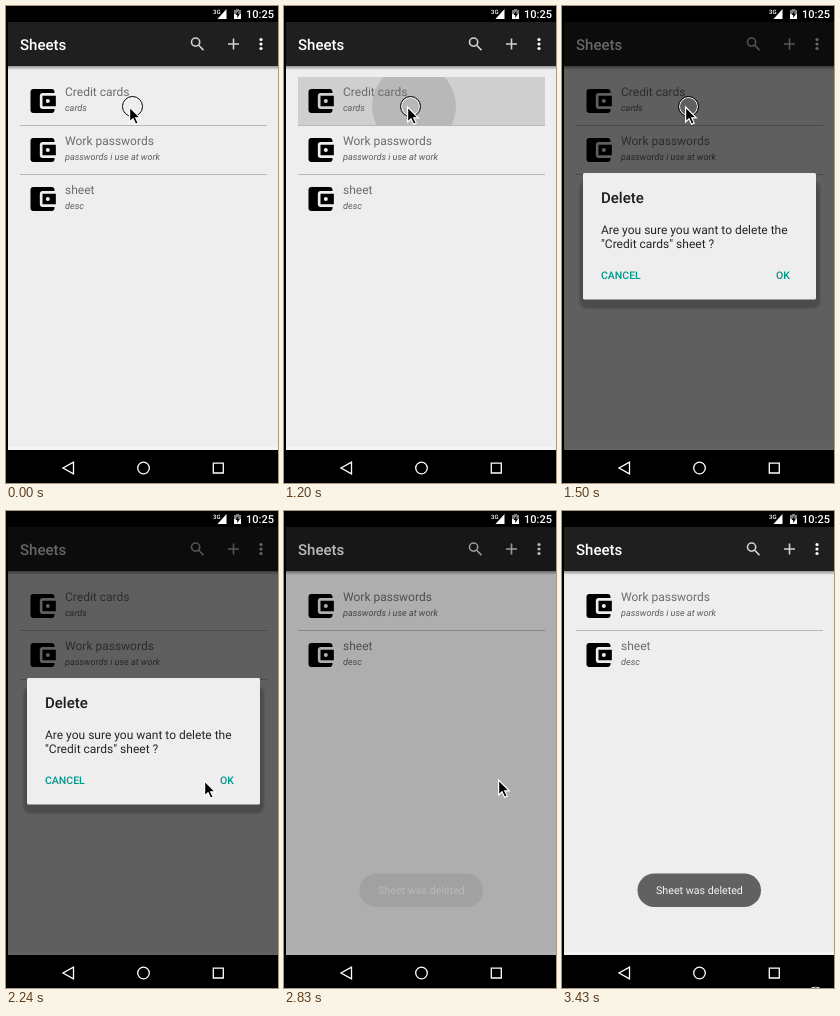
These frames come from a looping animation (272x477 px, 3500 ms). An HTML page:

```html
<!DOCTYPE html>
<html lang="en">
<head>
<meta charset="utf-8">
<title>Sheets</title>
<style>
  html, body { margin: 0; width: 100%; height: 100%; overflow: hidden; background: #000; }
  svg { display: block; width: 100vw; height: 100vh; }
  text { font-family: Roboto, sans-serif; text-rendering: geometricPrecision; }
  .bold { font-weight: 500; }
  .name { font-size: 12px; fill: #6c6c6c; }
  .note { font-size: 9.1px; font-style: italic; fill: #5c5c5c; }
  .head { font-size: 15px; }
  .body { font-size: 12px; fill: #242424; }
  .button { font-size: 10.5px; fill: #009688; }
  .line { fill: none; stroke: #fff; stroke-width: 1.3; }
</style>
</head>
<body>
<svg viewBox="0 0 272 477">
  <defs>
    <linearGradient id="shade" x2="0" y2="1">
      <stop stop-opacity=".38"/>
      <stop offset="1" stop-opacity="0"/>
    </linearGradient>
    <filter id="blur" x="-20%" y="-20%" width="140%" height="140%"><feGaussianBlur stdDeviation="1.2"/></filter>
    <clipPath id="rowClip"><path d="M14 71h247v48H14z"/></clipPath>
    <symbol id="wallet" viewBox="0 0 24 24">
      <path d="M21 18v1c0 1.1-.9 2-2 2H5c-1.1 0-2-.9-2-2V5c0-1.1.9-2 2-2h14c1.1 0 2 .9 2 2v1h-9c-1.1 0-2 .9-2 2v8c0 1.1.9 2 2 2zM12 16h10V8H12zm4-2.5a1.5 1.5 0 1 1 0-3 1.5 1.5 0 0 1 0 3z"/>
    </symbol>
  </defs>

  <path fill="#eee" d="M2 60h270v384H2z"/>
  <path fill="#f4f4f4" d="M2 441h270v3H2z"/>
  <path fill="url(#shade)" d="M2 60h270v4H2z"/>
  <path fill="#1f1f1f" d="M2 16h270v44H2z"/>

  <text class="head bold" x="14" y="43.5" fill="#fff">Sheets</text>
  <g fill="none" stroke="#d2d2d2" stroke-width="1.6">
    <circle cx="189.6" cy="36.1" r="4.1"/>
    <path d="M192.6 39.2l4.9 4.9M227.5 32.5v11M222 38h11"/>
  </g>
  <g fill="#fff">
    <circle cx="255" cy="33.5" r="1.6"/>
    <circle cx="255" cy="38" r="1.6"/>
    <circle cx="255" cy="42.5" r="1.6"/>
  </g>

  <g clip-path="url(#rowClip)">
    <path id="tint" d="M14 71h247v48H14z"/>
    <circle id="ripple" cx="130" cy="100" opacity=".11"/>
  </g>
  <g id="rows"></g>

  <path id="dim" d="M2 16h270v428H2z"/>

  <g id="dialog">
    <rect x="17.5" y="175" width="240.5" height="127.5" rx="7" opacity=".2" filter="url(#blur)"/>
    <rect x="21" y="167" width="233" height="126.5" rx="1.5" fill="#eee"/>
    <text class="head bold" x="39" y="197" fill="#1c1c1c">Delete</text>
    <text class="body" x="39" y="228">Are you sure you want to delete the</text>
    <text class="body" x="39" y="242">"Credit cards" sheet ?</text>
    <rect id="okPress" x="200" y="256" width="42" height="30" rx="1.5"/>
    <text class="button bold" x="39" y="273.3">CANCEL</text>
    <text class="button bold" x="214" y="273.3">OK</text>
  </g>

  <g id="toast">
    <rect x="75.5" y="362.5" width="123.5" height="33.5" rx="16.75" fill="#616161"/>
    <text x="94" y="383.3" font-size="10.7" fill="#f4f4f4">Sheet was deleted</text>
  </g>

  <path d="M0 0h272v16H0zM0 0h2v477H0zM0 444h272v33H0z"/>
  <g fill="#fff">
    <text class="bold" x="207" y="7.5" font-size="6">3G</text>
    <path d="M220.5 3v10h-9z"/>
    <path d="M228 4h2V3h3v1h2v4h-7z" opacity=".5"/>
    <path d="M228 8h7v5h-7z"/>
    <path d="M232.3 5l-2.8 4h1.7v3l2.7-4h-1.6z" fill="#000"/>
    <text class="bold" x="240" y="12" font-size="11">10:25</text>
  </g>
  <g class="line">
    <path d="M67.5 456.2v11.6L57 462z"/>
    <circle cx="137.5" cy="462" r="5.8"/>
    <path d="M207.3 457.2h10v9.8h-10z"/>
  </g>

  <g id="pointer">
    <g id="ring" fill="none">
      <circle cx="3.5" cy=".5" r="9" stroke="#fff"/>
      <circle cx="3.5" cy=".5" r="10" stroke="#000"/>
    </g>
    <path d="M.6 1V16L4 12.8 6.6 18.3 9.2 17.1 6.7 11.8H11.3Z" stroke="#fff" stroke-width="1.2"/>
  </g>
</svg>
<script>
  const LOOP = 3500;
  const BEAT = 148.9; // the screen refreshes once per beat; all times below are in beats
  const HOLD = 4, OPEN = 8, LEAVE = 11, CLICK = 17, DELETED = 19;
  const $ = id => document.getElementById(id);

  const ramp = (n, from, to) => Math.min(1, Math.max(0, (n - from) / (to - from)));
  const smooth = p => p * p * (3 - 2 * p);
  const mix = (a, b, p) => a + (b - a) * p;

  // Key points of the pointer: beat, x, y.
  const path = [
    [LEAVE, 123, 100], [12, 119, 115], [13, 69, 199], [14, 122, 260], [15, 198, 269],
    [CLICK, 214, 268], [DELETED, 214, 268], [20, 247, 436], [21, 250, 484.5]
  ];
  function pointerAt(n) {
    const next = path.findIndex(point => point[0] > n);
    if (next === 0) return path[0].slice(1);
    if (next < 0) return path[path.length - 1].slice(1);
    const [a, x, y] = path[next - 1];
    const [b, x2, y2] = path[next];
    const p = 1 - (1 - ramp(n, a, b)) ** 2;
    return [mix(x, x2, p), mix(y, y2, p)];
  }

  const sheets = [
    ['Credit cards', 'cards'],
    ['Work passwords', 'passwords i use at work'],
    ['sheet', 'desc']
  ];
  const row = ([name, note], i) => `<g transform="translate(0 ${i * 49})">
    ${i ? '<path fill="#b8b8b8" d="M14 70h247v1H14z"/>' : ''}
    <use href="#wallet" x="20.5" y="79" width="32" height="32"/>
    <text class="name" x="59" y="90">${name}</text>
    <text class="note" x="59" y="105">${note}</text></g>`;

  const fade = (id, value) => $(id).setAttribute('opacity', Number(value));

  function draw(n) {
    const deleted = n >= DELETED;
    const opening = ramp(n, OPEN, OPEN + 2);
    const held = ramp(n, HOLD, OPEN);
    const closing = ramp(n, DELETED - 1, DELETED + 1);

    $('rows').innerHTML = sheets.slice(deleted ? 1 : 0).map(row).join('');
    fade('tint', .13 * held * (1 - opening));
    $('ripple').setAttribute('r', opening < 1 ? 42 * held ** 1.7 : 0);
    fade('dim', .6 * opening * (1 - closing) ** 1.15);
    fade('dialog', deleted ? 0 : opening);
    fade('okPress', n === CLICK + 1 ? .14 : 0);
    fade('toast', smooth(ramp(n, DELETED - 1, DELETED + 3)));

    const [x, y] = pointerAt(n);
    $('pointer').setAttribute('transform', `translate(${x} ${y})`);
    fade('ring', n < 1 || (n >= HOLD && n < LEAVE) || n === CLICK || n > 22);
  }

  const start = performance.now();
  let shown;
  function tick() {
    const n = Math.floor((performance.now() - start) % LOOP / BEAT);
    if (n !== shown) draw(shown = n);
    requestAnimationFrame(tick);
  }
  tick();
</script>
</body>
</html>
```
